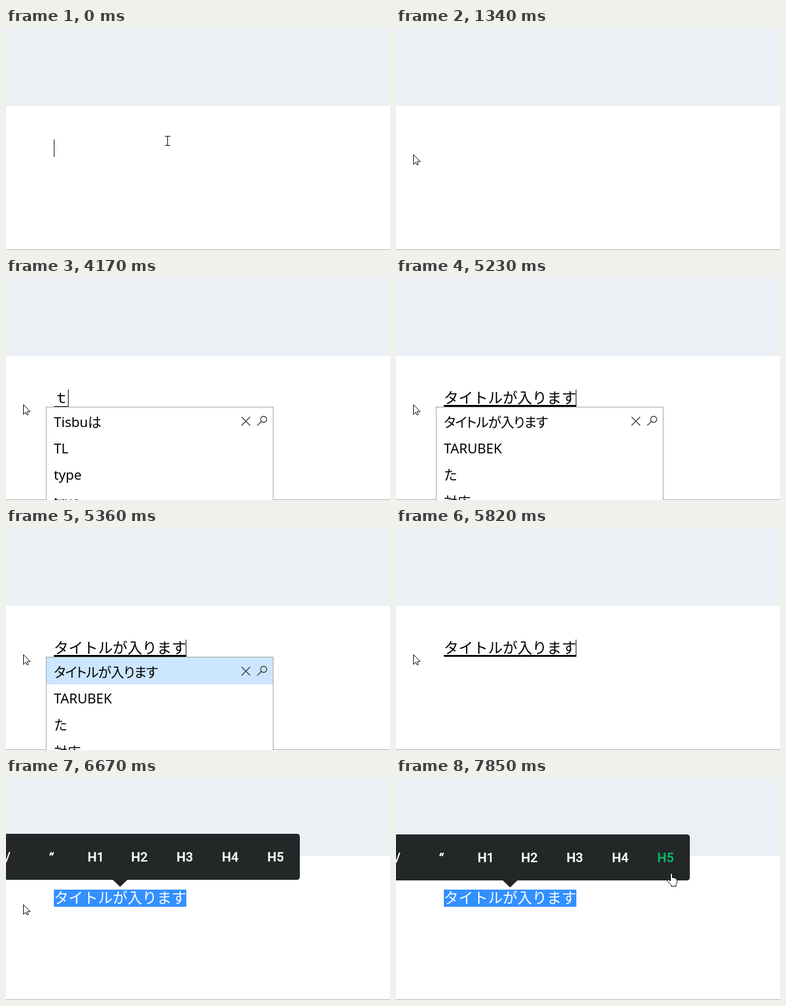
These frames come from a looping animation (626x362 px, 8000 ms). An HTML page:

```html
<!DOCTYPE html>
<html lang="ja">
<head>
<meta charset="utf-8">
<style>
html, body { margin: 0; width: 100%; height: 100%; overflow: hidden; background: #fff }
svg { display: block }
#title { font: 24px "Noto Sans CJK JP", "Noto Sans CJK", sans-serif }
#list text { font: 22px "Noto Sans", "Noto Sans CJK JP", "Noto Sans CJK", sans-serif }
#list .kana { font-feature-settings: "palt"; letter-spacing: -1px }
#bar text { font: 500 21px Roboto, sans-serif; fill: #fff; stroke: #fff; stroke-width: .3 }
#bar .quote { font-style: italic; font-weight: 700 }
#bar .hot { fill: #08b566; stroke: #08b566 }
#mouse path { stroke: #000; fill: #fff }
#mouse #beam { stroke: none; fill: #000 }
</style>
</head>
<body>
<svg width="626" height="362" viewBox="0 0 626 362">
  <rect width="626" height="127" fill="#ebf0f5"/>
  <rect y="361" width="626" height="1" fill="#b0b0b0"/>
  <rect id="selection" x="78" y="182" width="216" height="28" fill="#3390ff"/>
  <text id="title" x="78" y="204"></text>
  <rect id="underline" x="78"/>
  <rect id="caret" y="182" width="1" height="28"/>
  <g id="list">
    <rect x="65.5" y="210.5" width="370" height="160" fill="#fff" stroke="#a0a0a0"/>
    <rect id="chosen" x="66" y="211" width="369" height="44" fill="#cce6ff"/>
    <g id="rows"></g>
    <path d="M384 226.500l14 14m0-14l-14 14M417 233.500l-7.500 7" fill="none" stroke="#333" stroke-width="1.300"/>
    <circle cx="420" cy="230.500" r="5" fill="none" stroke="#333" stroke-width="1.300"/>
  </g>
  <g id="bar">
    <path d="M-9 92H474q5 0 5 5v65q0 5-5 5H198l-12 11.500-12-11.500H-9z" fill="#232728"/>
    <text x="-1" y="137">/</text>
    <text class="quote" x="69" y="137">“</text>
  </g>
  <g id="mouse">
    <path id="beam" d="M0 0h9v1h-4v14h4v1h-9v-1h4v-14h-4z"/>
    <path id="arrow" d="M.5.5v16l3.700-3.600 2.300 4.600 2-1-2-4.700h5z"/>
    <path id="hand" d="M6.500 12.500V2.200q0-1.700 1.500-1.700t1.500 1.700v5.300q2-1 2.800.700 2-.700 2.600.900 2.100-.4 2.100 1.900v4.500q0 2-1.500 3.500v2.500h-8v-2.300L1.600 13.500Q.500 11.500 2 10.800q1.500-.400 2.800 1.200z"/>
  </g>
</svg>
<script>
const $ = id => document.getElementById(id);
const show = (id, on) => $(id).setAttribute("display", on ? "inline" : "none");
const place = (id, attrs) => { for (const k in attrs) $(id).setAttribute(k, attrs[k]); };

function label(parent, x, y, string, cls = "") {
  const el = document.createElementNS("http://www.w3.org/2000/svg", "text");
  el.setAttribute("x", x);
  el.setAttribute("y", y);
  el.setAttribute("class", cls);
  el.textContent = string;
  return $(parent).appendChild(el);
}

const headings = [133, 204, 278, 352, 426].map((x, i) => label("bar", x, 137, "H" + (i + 1)));
const rows = [0, 1, 2, 3].map(i => label("rows", 78, 243 + 43.2 * i, ""));

const TITLE = "タイトルが入ります";
const first = ["Tisbuは", "TL", "type", "true"];
const second = [TITLE, "TARUBEK", "た", "対応"];

// Timelines: [start ms, values...]
const carets = [
  [0, 78], [250], [790, 78], [1340], [1900, 78], [2430], [2860, 78], [3390],
  [3920, 78], [4170, 101], [5230, 293], [6370]
];
const titles = [[0, ""], [4170, "ｔ"], [4700, "た"], [5230, TITLE]];
const lines = [[0, 0, 0], [4170, 23, 1], [5230, 215, 3], [5940, 0, 0]];
const moves = [
  [0, "beam", 259, 176], [660, "beam", 70, 313], [790, "arrow", 14, 197],
  [940, "arrow", 22, 202], [1070, "arrow", 28, 206], [7100, "beam", 150, 210],
  [7220, "beam", 330, 268], [7340, "beam", 443, 307], [7490, "beam", 452, 250],
  [7610, "arrow", 451, 196], [7730, "hand", 444, 160], [7850, "hand", 441, 155]
];
const at = (line, t) => line.findLast(step => step[0] <= t);

function draw(now) {
  const t = now % 8000;
  const selected = t >= 6520;

  const [, caretX] = at(carets, t);
  show("caret", caretX);
  if (caretX) place("caret", { x: caretX });

  $("title").textContent = at(titles, t)[1];
  place("title", { fill: selected ? "#fff" : "#000" });
  show("selection", selected);
  const [, width, height] = at(lines, t);
  place("underline", { width, height, y: 210 - height });

  show("list", t >= 4170 && t < 5820);
  show("chosen", t >= 5360);
  const words = t < 4700 ? first : second;
  rows.forEach((row, i) => {
    row.textContent = words[i];
    row.setAttribute("class", words[i] === TITLE ? "kana" : "");
  });

  show("bar", t >= 6670);
  place("bar", { transform: `translate(0 ${t < 6790 ? -1 : 0})` });
  headings[4].setAttribute("class", t >= 7730 ? "hot" : "");

  const [, shape, x, y] = at(moves, t);
  for (const id of ["beam", "arrow", "hand"]) show(id, id === shape);
  place("mouse", { transform: `translate(${x} ${y})` });
}

const start = performance.now();
function loop() {
  draw(performance.now() - start);
  requestAnimationFrame(loop);
}
loop();
</script>
</body>
</html>
```
